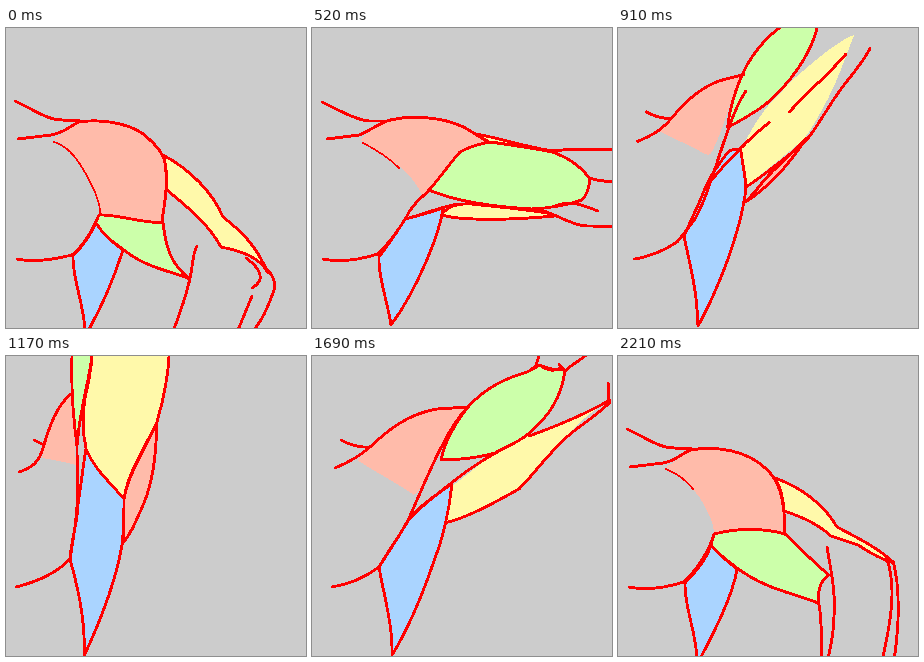
These frames come from a looping animation (300 by 300 pixels, 2.34 s). An HTML page:

```html
<!DOCTYPE html>
<html lang="en">
<head>
<meta charset="utf-8">
<title>Shoulder muscles</title>
<style>
  html, body { margin: 0; width: 100%; height: 100%; overflow: hidden; background: #ccc; }
  svg { display: block; width: 100vw; height: 100vh; }
  path { fill: none; stroke: #f00; stroke-width: 2.9; stroke-linecap: round; stroke-linejoin: round; shape-rendering: crispEdges; }
  .deltoid { fill: #ffbbaa; stroke: none; }
  .outer, .triceps { fill: #fff9aa; }
  .triceps { stroke: none; }
  .biceps { fill: #ccffaa; }
  .rear { fill: #ffbbaa; }
  .lat { fill: #aad4ff; }
  .pec { stroke-width: 1.7; }
</style>
</head>
<body>
<svg id="stage" viewBox="0 0 300 300"></svg>
<script>
const STEP = 130, SLOTS = 18;
const NS = "http://www.w3.org/2000/svg";

// Painting order, back to front.
const PARTS = ["deltoid", "outer", "triceps", "biceps", "rear", "lat", "neck", "shoulder", "pec", "side",
  "ridge", "under", "over", "arm1", "arm2", "arm3", "arm4", "elbow"];

const lowPose = {
  deltoid: "M48 111C60 105 62 98 73 94C100 90 130 97 143 111C155 122 160 130 160 145C162 165 157 180 156 195C135 194 115 187 93 187C97 178 88 160 80 145C70 128 60 116 48 111Z",
  outer: "M157 127C185 142 207 165 217 189C235 203 250 217 262 245C254 229 235 223 215 219C202 195 180 178 161 162C161 145 160 135 157 127Z",
  biceps: "M93 187C110 186 130 194 157 195C160 220 165 237 184 251C165 243 140 240 118 222C105 213 95 205 89 195Z",
  lat: "M67 228C76 219 84 208 90 195C98 208 108 215 117 222C108 250 95 280 82 303L79 303C78 275 66 250 67 228Z",
  neck: "M9 73C30 83 42 92 56 92L75 93",
  shoulder: "M12 111L45 107C58 105 62 99 73 94C100 90 130 97 143 111C155 122 160 130 160 145C162 165 157 180 156 195",
  pec: "M48 114C60 118 68 126 77 141C87 158 95 174 94 186",
  side: "M11 231C30 235 50 231 66 227C77 218 85 206 93 187",
  arm1: "M260 240C270 250 270 258 267 265C262 278 258 290 245 306",
  arm2: "M240 230C255 241 260 252 246 260",
  arm3: "M191 218C186 225 187 243 182 258C178 275 172 290 168 301",
  arm4: "M246 268L232 302",
  elbow: "M176 245L184 251"
};

const raisedPose = {
  deltoid: "M48 111C60 105 62 98 73 94C100 89 130 96 146 111C160 122 167 140 167 178C140 172 115 172 96 178C97 170 90 155 82 142C72 128 60 116 48 111Z",
  outer: "M157 122C185 132 207 150 219 171C240 182 262 193 276 207C262 203 252 197 240 189L213 180C200 168 185 161 166 155C165 140 162 130 157 122Z",
  biceps: "M96 178C120 172 145 172 167 178C180 190 195 206 211 219C204 224 200 230 200 247C180 238 150 235 119 212C110 205 100 198 93 189Z",
  lat: "M67 227C77 217 88 205 93 189C100 198 110 206 119 213C115 240 95 278 82 303L79 303C78 275 66 250 67 227Z",
  neck: "M9 73C30 83 42 92 56 92L75 93",
  shoulder: "M12 111L45 107C58 105 62 98 73 94C100 89 130 96 146 111C160 122 167 140 167 178",
  pec: "M48 113C60 118 68 124 75 133",
  side: "M11 231C30 235 50 231 66 226C80 212 90 198 96 178",
  arm1: "M275 205C282 230 282 270 275 310",
  arm2: "M268 201C280 230 272 270 263 310",
  arm3: "M209 191C212 210 218 235 216 260C216 275 213 290 210 302",
  arm4: "M200 245C204 255 203 280 204 302"
};

const levelPose = {
  deltoid: "M48 112C60 102 65 95 78 92C105 86 140 90 160 104L175 114C160 116 150 121 145 126C135 138 128 150 117 162L110 167C105 155 95 145 88 139C75 128 62 119 48 112Z",
  outer: "M163 106C180 108 205 117 240 123C215 121 195 115 177 114Z",
  triceps: "M130 186C137 178 145 175 160 176C185 179 215 181 230 182L243 187C220 190 190 192 160 191C145 191 135 190 130 186Z",
  biceps: "M117 162C128 150 138 135 148 124C158 118 168 116 177 114C200 117 225 121 240 124C258 130 270 140 278 151C277 160 275 167 270 172C255 177 240 180 220 181C185 179 145 174 117 162Z",
  lat: "M67 229C75 218 85 205 93 191C105 188 120 184 131 180C128 205 105 262 79 297C75 270 66 250 67 229Z",
  neck: "M10 74C30 84 45 92 57 93L78 93",
  shoulder: "M15 111L47 107C58 103 65 96 78 92C105 86 140 90 160 104L176 114",
  pec: "M51 115C65 122 77 130 87 140",
  side: "M11 231C30 235 50 231 66 226C80 212 88 200 95 188C100 176 110 170 117 162",
  ridge: "M93 191C110 187 125 180 145 176",
  under: "M130 187C145 192 190 193 243 188",
  over: "M130 186C137 178 145 175 160 176C185 179 215 181 240 186",
  arm1: "M240 123C265 120 285 120 380 126",
  arm2: "M278 150C288 154 295 155 380 152",
  arm3: "M243 178C258 172 268 176 286 183",
  arm4: "M228 182C245 186 260 198 275 198L380 199"
};

const highPose = {
  deltoid: "M45 104C58 93 70 78 85 68C105 55 130 52 155 51C143 65 133 85 125 103C115 122 108 135 102 139C85 127 65 117 45 104Z",
  triceps: "M133 167C138 155 138 143 140 130C155 119 170 106 183 97C195 90 205 85 215 80C240 72 265 60 290 49C255 72 235 105 205 135C180 148 155 160 133 167Z",
  biceps: "M129 104C133 85 145 65 156 51C175 30 195 22 215 16L228 9C235 13 243 14 253 14C250 40 238 60 215 79C205 87 195 90 183 97C165 102 147 104 129 104Z",
  rear: "M133 167C160 160 185 145 207 133C185 145 160 160 133 167Z",
  lat: "M67 211C78 194 88 178 98 162C110 148 125 138 140 128C137 155 132 180 122 205C110 240 95 275 80 299C81 270 72 240 67 211Z",
  neck: "M29 84C38 89 47 92 58 91",
  shoulder: "M23 112C35 107 48 100 58 91C75 75 95 58 125 53L156 51",
  side: "M20 231C40 228 55 220 67 211C77 193 90 178 98 160C110 133 120 108 131 88C140 70 147 60 156 51",
  ridge: "M98 162C115 145 135 130 155 115C165 108 178 100 187 95",
  under: "M133 167C160 160 185 145 207 133C225 115 240 92 262 75C275 65 290 55 298 46",
  over: "M217 80C245 70 270 60 298 44",
  arm1: "M217 15L224 10L228 -4",
  arm2: "M253 15C260 8 268 5 278 -4",
  arm3: "M230 11C237 14 242 16 248 12",
  arm4: "M295 48C298 42 297 35 296 27",
  elbow: "M247 8L253 15"
};

const uprightPose = {
  deltoid: "M36 102C40 82 50 52 65 38C66 60 69 85 70 109C60 106 48 104 36 102Z",
  triceps: "M118 143C100 130 88 115 80 92C76 75 77 55 79 42C83 25 85 15 86 0C92 -40 110 -70 130 -80C160 -50 163 -20 163 0C162 25 157 45 151 66C140 90 122 115 118 143Z",
  biceps: "M71 90C67 60 65 30 66 0C67 -30 75 -60 85 -80L100 -80C100 -50 90 -20 86 0C83 25 75 50 72 80Z",
  rear: "M117 187C125 178 130 165 138 147C147 125 150 100 151 66C140 92 122 118 118 143C118 155 118 172 117 187Z",
  lat: "M64 203C65 185 72 165 72 148C75 130 77 110 80 93C88 113 103 125 118 143C118 160 118 175 116 189C110 225 92 270 78 300C80 262 70 225 64 203Z",
  neck: "M28 84L38 89",
  shoulder: "M13 116C25 112 33 107 37 92C43 72 50 50 65 38",
  side: "M10 231C30 226 50 218 64 203C66 190 70 170 71 150C72 125 71 110 71 88",
  ridge: "M72 148C75 130 77 110 80 93",
  under: "M118 143C122 115 140 90 151 66C157 45 162 25 163 0L160 -30",
  over: "M80 92C76 75 77 55 79 42C83 25 85 15 86 0L88 -10"
};

function makePath(d, name) {
  const path = document.createElementNS(NS, "path");
  path.setAttribute("d", d);
  if (name) path.setAttribute("class", name);
  return path;
}

function blendPath(a, b, k) {
  const n = 64, from = makePath(a), to = makePath(b);
  const lenA = from.getTotalLength(), lenB = to.getTotalLength();
  const points = [];
  for (let i = 0; i <= n; i++) {
    const p = from.getPointAtLength(lenA * i / n);
    const q = to.getPointAtLength(lenB * i / n);
    points.push((p.x + (q.x - p.x) * k).toFixed(1) + " " + (p.y + (q.y - p.y) * k).toFixed(1));
  }
  return "M" + points.join("L") + (a.endsWith("Z") ? "Z" : "");
}

function blend(a, b, k) {
  const pose = {};
  for (const name of PARTS) if (a[name] && b[name]) pose[name] = blendPath(a[name], b[name], k);
  return pose;
}

const poses = [
  lowPose, raisedPose, blend(raisedPose, levelPose, 0.5),
  levelPose, blend(levelPose, highPose, 0.5),
  highPose, blend(highPose, uprightPose, 1 / 3), blend(highPose, uprightPose, 2 / 3),
  uprightPose
];

const svg = document.getElementById("stage");
const groups = poses.map(pose => {
  const group = document.createElementNS(NS, "g");
  for (const name of PARTS) if (pose[name]) group.append(makePath(pose[name], name));
  svg.append(group);
  return group;
});

// The arm rises, holds both ends for two slots, and returns.
function draw(time) {
  const slot = Math.floor(time / STEP) % SLOTS;
  const current = slot <= 9 ? Math.max(slot - 1, 0) : SLOTS - slot;
  groups.forEach((group, i) => group.style.display = i === current ? "" : "none");
}

const startTime = performance.now();
function tick() {
  draw(performance.now() - startTime);
  requestAnimationFrame(tick);
}
tick();
</script>
</body>
</html>
```
